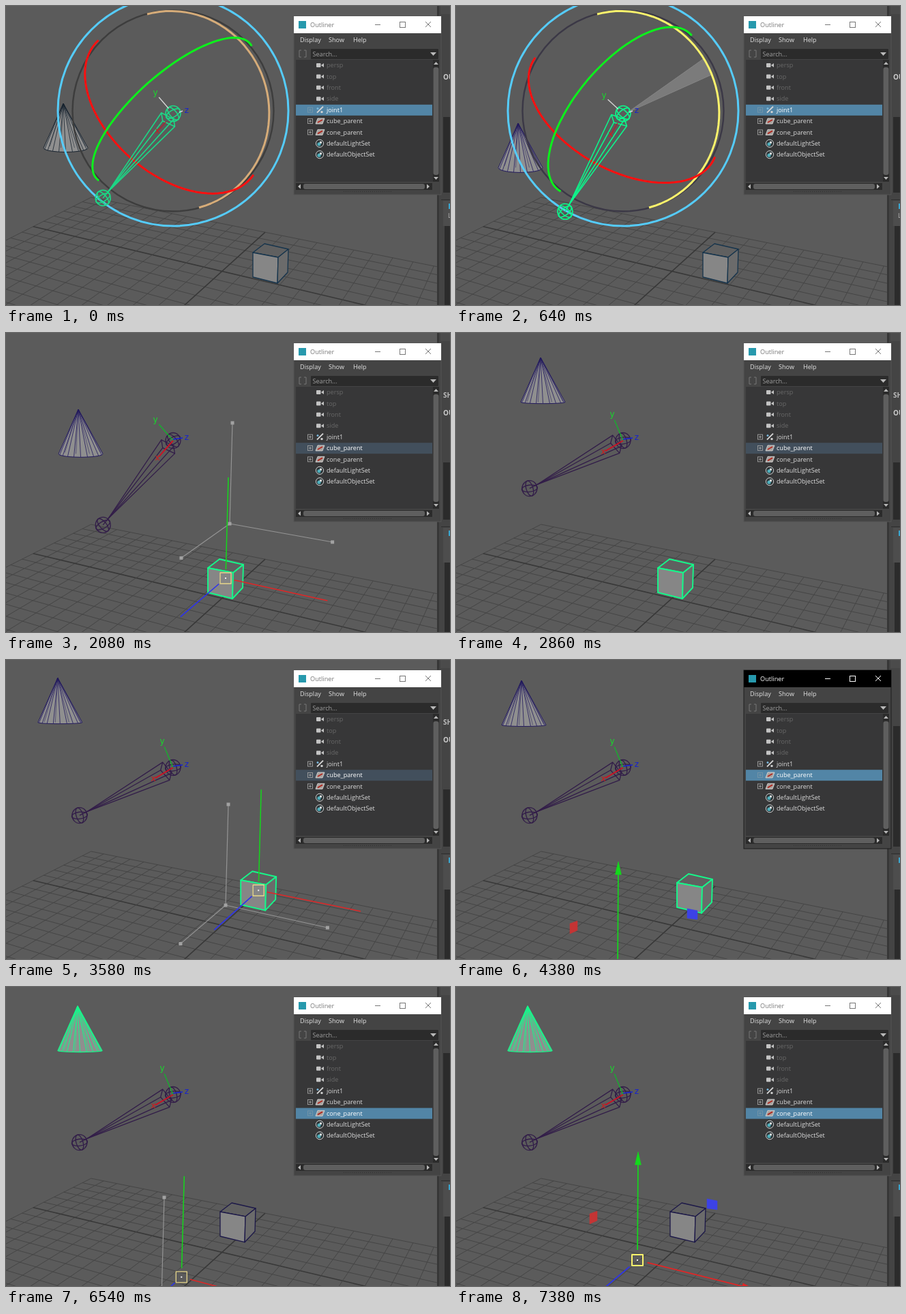
An HTML page for the animation above (7.44 s loop, 651 by 439 pixels).

```html
<!DOCTYPE html>
<html lang="en">
<head>
<meta charset="utf-8">
<title>Rig viewport</title>
<style>
html, body { margin: 0; width: 100%; height: 100%; overflow: hidden; background: #5b5b5b; }
svg { display: block; width: 651px; height: 439px; }
text { font-family: "Open Sans", "Noto Sans", sans-serif; font-size: 9.1px; }
.axis { font-family: "DejaVu Sans", sans-serif; font-size: 12px; }
</style>
</head>
<body>
<svg viewBox="0 0 651 439" xmlns="http://www.w3.org/2000/svg">
  <defs>
    <clipPath id="view"><rect width="633" height="439"/></clipPath>
  </defs>
  <rect width="651" height="439" fill="#5b5b5b"/>
  <g clip-path="url(#view)">
    <g id="grid" fill="none"></g>
    <g id="scene" fill="none" stroke-linejoin="round"></g>
  </g>
  <g id="side"></g>
  <g id="outliner"></g>
</svg>
<script>
const LOOP = 7440;
const $ = id => document.getElementById(id);
const GREEN = '#16f78a', NAVY = '#221a5c', PURPLE = '#321d49';
const VX = [-1600, -65], VZ = [830, -75];   // vanishing points of the ground axes
const ROOT = [245, 158], HUB = [245, 154];

// ---- helpers ----
const add = (p, q, k = 1) => [p[0] + q[0] * k, p[1] + q[1] * k];
const unit = (p, q) => {
  const x = q[0] - p[0], y = q[1] - p[1], l = Math.hypot(x, y);
  return [x / l, y / l];
};
const rad = deg => deg * Math.PI / 180;
const pt = p => p[0].toFixed(1) + ' ' + p[1].toFixed(1);
const path = (pts, stroke, w = 1, fill = 'none', close = true) =>
  `<path d="M${pts.map(pt).join('L')}${close ? 'Z' : ''}" stroke="${stroke}" stroke-width="${w}" fill="${fill}"/>`;
const line = (p, q, stroke, w = 1) => path([p, q], stroke, w, 'none', false);
const rect = (x, y, w, h, fill, extra = '') =>
  `<rect x="${x}" y="${y}" width="${w}" height="${h}" fill="${fill}" ${extra}/>`;
const text = (x, y, s, fill, extra = '') => `<text x="${x}" y="${y}" fill="${fill}" ${extra}>${s}</text>`;
const within = (t, spans) => spans.find(s => t >= s[0] && t < s[1]);

function track(keys, t) {
  if (t <= keys[0][0]) return keys[0].slice(1);
  for (let i = 1; i < keys.length; i++) {
    const a = keys[i - 1], b = keys[i];
    if (t < b[0]) {
      let k = (t - a[0]) / (b[0] - a[0]);
      k = k * k * (3 - 2 * k);
      return a.slice(1).map((v, n) => v + (b[n + 1] - v) * k);
    }
  }
  return keys[keys.length - 1].slice(1);
}
// smooth value through three poses: j = -1, 0, 1
const pose = (j, c, a, b) => a + (b - c) / 2 * j + ((b + c) / 2 - a) * j * j;

// ---- motion ----
const JOINT = [[120, 0], [640, 1], [700, 1], [900, 0], [2340, 0], [2560, -1]];
const CUBE = [[1060, 388, 377], [1420, 328, 280], [1640, 328, 280], [2080, 322, 360],
  [3290, 322, 360], [3560, 371, 338], [3780, 338, 347], [3960, 350, 342],
  [4720, 350, 342], [4900, 410, 332], [5160, 285, 351], [5440, 362, 339], [5640, 340, 345]];
const CONE = [[120, 84, 143], [640, 91, 172], [700, 91, 172], [900, 84, 143], [1060, 84, 143],
  [1420, 66, 46], [1640, 66, 46], [2080, 106, 112], [2340, 106, 112], [2560, 124, 36],
  [3290, 124, 36], [3560, 75, 26], [3780, 108, 33], [3960, 96, 30],
  [4720, 96, 30], [4900, 36, 24], [5160, 160, 33], [5440, 84, 27], [5640, 105, 28]];
const PIVOT = [[6180, 228, 457], [6420, 286, 404], [6640, 236, 442], [6840, 268, 394],
  [7040, 230, 448], [7220, 276, 379], [7360, 266, 401]];
const DRAGS = [[1060, 1560], [1640, 2090], [3290, 3970], [4720, 5630], [6180, 7370]];
const ACTIVE = [[4200, 4720], [5700, 6180]];

const selected = t => t < 940 ? 'joint' : t < 2200 ? 'cube' : t < 2800 ? 'joint'
  : t < 4320 ? 'cube' : t < 5820 ? 'cubeP' : 'coneP';

// ---- ground ----
function drawGrid() {
  const at = (k, m) => {
    const a = .2046 - k * .0144, b = .1355 - m * .024, w = 1 + a + b;
    return [(382 + a * VX[0] + b * VZ[0]) / w, (400 + a * VX[1] + b * VZ[1]) / w];
  };
  const bar = (p, q, bold) => line(p, q, bold ? '#383838' : '#454545', bold ? 1.6 : 1);
  let s = '';
  for (let i = 0; i <= 24; i++) s += bar(at(i, 0), at(i, 24), i == 12) + bar(at(0, i), at(24, i), i == 6);
  $('grid').innerHTML = s;
}

// ---- objects ----
function cube(c, edge, w) {
  const d = Math.max(0, (350 - c[1]) / 18);
  const [tl, tb, tr, tf, bl, bf, br] = [[-26, -15], [-9, -28], [26, -20], [11, -8 - d / 2],
    [-26, 21], [10, 30 - d], [25, 14 - d]].map(p => add(c, p));
  return path([tl, tb, tr, tf], edge, w, '#606060') + path([tl, tf, bf, bl], edge, w, '#868686') +
    path([tf, tr, br, bf], edge, w, '#6b6b6b');
}

function cone(a, edge, w) {
  const c = add(a, [3.5, 65.5]), ry = 2 + Math.max(0, c[1] - 95) * .035, n = 10;
  const rim = [];
  for (let i = 0; i <= n; i++) {
    const q = i / n * Math.PI;
    rim.push([c[0] + 32.5 * Math.cos(q), c[1] + ry * Math.sin(q)]);
  }
  let s = path([a, ...rim], edge, w, '#8f8f8f');
  rim.slice(1, -1).forEach((p, i) => {
    s += line(a, p, edge, w * .8);
    if (i % 2) s += line(a, [p[0] + 3, p[1] - ry], edge, w * .5);
  });
  return s;
}

function ball(c, deg, col, w) {
  const ring = (rx, ry, r) =>
    `<ellipse rx="${rx}" ry="${ry}" transform="translate(${pt(c)}) rotate(${r})" stroke="${col}" stroke-width="${w}"/>`;
  return ring(11, 11.5, 0) + ring(11.5, 5, deg + 20) + ring(11.5, 5, deg + 100);
}

function bone(j, col, w, picked) {
  const deg = pose(j, 152.9, 129.7, 120.6), len = pose(j, 154, 161, 167), r = rad(deg);
  const d = [Math.cos(r), Math.sin(r)], n = [d[1], -d[0]];
  const end = add(ROOT, d, len), tip = add(ROOT, d, len - 12);
  const base = [[10, -14], [18, -5], [13, 14], [6, 6]].map(([u, v]) => add(add(ROOT, d, u), n, v));
  let s = path(base, col, w);
  base.forEach(p => s += line(p, tip, col, w));
  s += line(tip, end, col, w) + ball(ROOT, deg, col, w) + ball(end, deg, col, w);

  const yl = [pose(j, -16, -26, -28), pose(j, -38, -30, -26)];
  const xl = [pose(j, -29, -23, -18), pose(j, 17, 26, 31)];
  s += line(add(ROOT, yl, picked ? .25 : 0), add(ROOT, yl, .8), picked ? '#d8d8d8' : '#12b52c', 1.3);
  s += line(add(ROOT, [picked ? 9 : 0, -2]), add(ROOT, [14, -4]), picked ? '#d0d0e0' : '#1420d8', 1.4);
  s += line(add(ROOT, xl, picked ? .45 : 0), add(ROOT, xl, .9), '#c81426', picked ? 1.2 : 2);
  const label = (p, ch, fill) =>
    `<text class="axis" x="${p[0].toFixed(1)}" y="${(p[1] + 3).toFixed(1)}" text-anchor="middle" fill="${fill}">${ch}</text>`;
  return s + label(add(ROOT, yl), 'y', '#18d82c') + label(add(ROOT, [20, -4]), 'z', '#1622d0') +
    label(add(ROOT, xl), 'x', '#d01c1c');
}

// near half of a tilted ring, running a little past both ends
function halfRing(deg, major, minor, over, col) {
  const r = rad(deg), c = Math.cos(r), s = Math.sin(r), pts = [];
  for (let i = 0; i <= 48; i++) {
    const q = rad(-over + (180 + 2 * over) * i / 48), u = major * Math.cos(q), v = minor * Math.sin(q);
    pts.push(add(HUB, [u * c - v * s, u * s + v * c]));
  }
  return path(pts, col, 3, 'none', false);
}

function rings(j, drag) {
  let s = '';
  if (drag && Math.abs(j) > .01) {
    const rim = [];
    for (let i = 0; i <= 4; i++) {
      const q = rad(-22.3 - pose(j, -23, 0, 10.7) * i / 4);
      rim.push(add(HUB, [Math.cos(q) * 141, Math.sin(q) * 141]));
    }
    s += path([[252, 156], ...rim], '#858585', 1, 'rgba(145,145,145,.6)');
  }
  return s + `<circle cx="245" cy="154" r="147.5" stroke="${drag ? '#3b3846' : '#3d3d3d'}" stroke-width="2.4"/>` +
    halfRing(-105, 147, 140.5, 0, drag ? '#fbf36c' : '#d6ac79') +
    halfRing(pose(j, 64, 41, 29), 151, pose(j, 100, 93, 87), 4, '#fb1010') +
    halfRing(pose(j, -20, -41.4, -50) + 180, 150, pose(j, 20, 55, 69), 5, '#0cf01c') +
    `<circle cx="245" cy="154" r="169" stroke="#55ccfb" stroke-width="3"/>`;
}

// ---- move handle ----
const axes = (p, k = 1) => [add(p, unit(VX, p), 153 * k), add(p, [4, -148]), add(p, unit(VZ, p), 87 * k)];

function handle(p, from) {
  const cols = ['#e02626', '#14d81c', '#2a30f0'];
  let s = '';
  if (from) {
    axes(from).forEach(e => s += line(from, e, '#949494', 1.2) + rect(e[0] - 2.5, e[1] - 2.5, 5, 5, '#a2a2a2'));
    s += rect(from[0] - 2.5, from[1] - 2.5, 5, 5, '#a2a2a2');
    axes(p).forEach((e, i) => s += line(add(p, unit(p, e), 13), e, cols[i], 1.5));
  } else {
    const ends = axes(p, 1.16);
    ends[1] = add(p, [1, -159]);
    ends.forEach((e, i) => {
      const u = unit(p, e), b = add(e, u, -19), n = [u[1], -u[0]];
      s += line(add(p, u, 15), b, cols[i], 1.7) + path([e, add(b, n, 4.5), add(b, n, -4.5)], cols[i], .6, cols[i]);
    });
    const plane = (o, c, pts) => path(pts.map(q => add(add(p, o), q)), c, .5, c);
    s += plane([-65, -63], '#c43434', [[-5, -5], [6, -9], [6, 5], [-5, 10]]);
    s += plane([109, -82], '#3c42e6', [[-7, -8], [8, -5], [8, 8], [-7, 6]]);
    s += plane([52, 78], '#2fae38', [[-9, 2], [5, 6], [10, -2], [-3, -6]]);
  }
  return s + rect(p[0] - 8, p[1] - 8, 16, 16, 'none', `stroke="${from ? '#e6d68a' : '#fbf36c'}" stroke-width="${from ? 1.3 : 2}"`) +
    rect(p[0] - 1, p[1] - 1, 2, 2, '#eee');
}

function drawScene(t) {
  const sel = selected(t), drag = within(t, DRAGS);
  const j = track(JOINT, t)[0], spin = sel == 'joint' && (t > 120 && t < 900 || t > 2320);
  const onJoint = sel == 'joint', c = track(CUBE, t), onCube = sel == 'cube' || sel == 'cubeP';
  let s = cone(track(CONE, t), sel == 'coneP' ? GREEN : onJoint && !spin ? '#17222e' : NAVY, sel == 'coneP' ? 1.3 : 1);
  s += cube(c, onCube ? GREEN : onJoint ? '#16344c' : '#1c1848', onCube ? 1.9 : 1.3);
  if (onJoint && t < 2620) s += rings(j, spin);
  s += bone(j, onJoint ? (spin ? '#0cf88c' : '#1cd886') : PURPLE, onJoint ? 1.6 : 1.3, onJoint);
  const spot = time => sel == 'cube' ? track(CUBE, time)
    : sel == 'cubeP' ? add(track(CUBE, time), [-113, 113]) : track(PIVOT, time);
  if (!onJoint && !(t >= 2800 && t < 2980)) s += handle(spot(t), drag && spot(drag[0]));
  $('scene').innerHTML = s;
}

// ---- strip at the right ----
function drawSide(sel) {
  const top = { joint: 163, cube: 190 }[sel] || 97, low = sel == 'joint' ? 323 : 337;
  let s = rect(632, 0, 19, 439, '#444') + rect(632, 0, 3, 439, '#373737') + rect(637, 0, 14, 12, '#4b4b4b');
  s += rect(641, top, 10, 274 - top, '#2b2b2b') + rect(638, 284, 13, 1, '#2e2e2e');
  s += rect(641, 286, 10, low - 286, '#4d4d4d') + rect(643, low, 8, 439 - low, '#2b2b2b');
  s += rect(649, 290, 2, 8, '#3aa6cf');
  const bold = 'font-weight="700" style="font-size:10px"';
  if (sel == 'joint') s += text(641, 108, 'OU', '#ccc', bold) + text(648, 311, 'L', '#bbb');
  if (sel == 'cube') s += text(641, 95, 'SH', '#bbb', bold) + text(641, 121, 'OU', '#ccc', bold);
  $('side').innerHTML = s;
}

// ---- outliner window ----
const ROWS = ['persp', 'top', 'front', 'side', 'joint1', 'cube_parent', 'cone_parent', 'defaultLightSet', 'defaultObjectSet'];

function icon(i, y, picked) {
  if (i < 4) return rect(455, y - 3, 6.5, 6, '#c4c4c4', 'rx="1"') +
    path([[462, y], [466, y - 3], [466, y + 3]], 'none', 0, '#c4c4c4');
  if (i > 6) return `<circle cx="460" cy="${y}" r="5.6" fill="#2c3437" stroke="#cfcfcf"/>` +
    `<circle cx="459" cy="${y + 1}" r="2.6" fill="#4fb0bd"/>` + rect(460, y - 3, 3, 3, '#ddd');
  const tone = picked ? '#7796a8' : '#a0a0a0';
  const box = rect(442.5, y - 3.5, 7, 7, 'none', `stroke="${tone}" stroke-width=".9"`) +
    line([444, y], [448, y], tone) + line([446, y - 2], [446, y + 2], tone);
  if (i == 4) return box + line([456, y + 4], [465, y - 5], '#d5d5d5', 2) +
    `<circle cx="457" cy="${y - 2}" r="1.5" fill="#7bb8dc"/><circle cx="463" cy="${y + 3}" r="1.7" fill="#d5d5d5"/>`;
  return box + path([[457, y - 4], [467, y - 4], [464, y + 4], [454, y + 4]], '#ddd', .8, '#a9a29e') +
    line([457, y + 2], [464, y - 2], '#b0271f', 1.8);
}

function drawOutliner(sel, active) {
  const fg = active ? '#fff' : '#777', tri = (...p) => path(p, 'none', 0, '#b9b9b9');
  let s = rect(422, 15, 216, 262, '#444', `stroke="${active ? '#1d1d1d' : '#555'}" stroke-width="1"`);
  s += rect(422, 15, 216, 25, active ? '#000' : '#fff');
  s += rect(429, 22, 11, 11, '#2799ad') + text(446, 31, 'Outliner', fg, 'style="font-size:9.2px"');
  s += line([541, 27.5], [549, 27.5], fg) + rect(577.5, 23.5, 8, 8, 'none', `stroke="${fg}"`);
  s += line([615, 23], [623, 31], fg) + line([623, 23], [615, 31], fg);
  [[431, 'Display'], [473, 'Show'], [509, 'Help']].forEach(m => s += text(m[0], 53, m[1], '#e2e2e2'));
  s += `<path d="M433 65h-3v10h3M437 65h3v10h-3" fill="none" stroke="#777"/>`;
  s += rect(447, 63, 187, 15, '#2b2b2b', 'rx="1"') + text(449.5, 74, 'Search...', '#a2a2a2');
  s += tri([622, 68], [631, 68], [626.5, 73]);
  s += rect(425, 79, 201, 179, '#373738');
  const picked = { joint: 4, cube: 5, cubeP: 5, coneP: 6 }[sel];
  ROWS.forEach((name, i) => {
    const y = 87 + i * 16.4;
    if (i == picked) s += rect(425, y - 7.8, 200, 16, sel == 'cube' ? '#424f5c' : '#5285a6');
    s += icon(i, y, i == picked && sel != 'cube') + text(470, y + 3.2, name, i < 4 ? '#696969' : i == picked ? '#fff' : '#dcdcdc');
  });
  s += rect(626, 79, 9, 179, '#2b2b2b') + rect(626.5, 90, 8, 158, '#5f5f5f', 'rx="3"');
  s += tri([627, 86], [634, 86], [630.5, 82]) + tri([627, 251], [634, 251], [630.5, 255]);
  s += rect(425, 260, 200, 10, '#2b2b2b') + rect(436, 261, 178, 8, '#5f5f5f', 'rx="3"');
  s += tri([432, 261.5], [432, 268.5], [428, 265]) + tri([617, 261.5], [617, 268.5], [621, 265]);
  s += `<path d="M495 272.5H565" stroke="#333" stroke-dasharray="1 2"/>`;
  $('outliner').innerHTML = s;
}

// ---- clock ----
let uiState = '';
function draw(t) {
  const sel = selected(t), active = !!within(t, ACTIVE), state = sel + active;
  drawScene(t);
  if (state != uiState) {
    drawSide(sel);
    drawOutliner(sel, active);
    uiState = state;
  }
}
drawGrid();
draw(0);
const start = performance.now();
(function tick() {
  draw((performance.now() - start) % LOOP);
  requestAnimationFrame(tick);
})();
</script>
</body>
</html>
```
